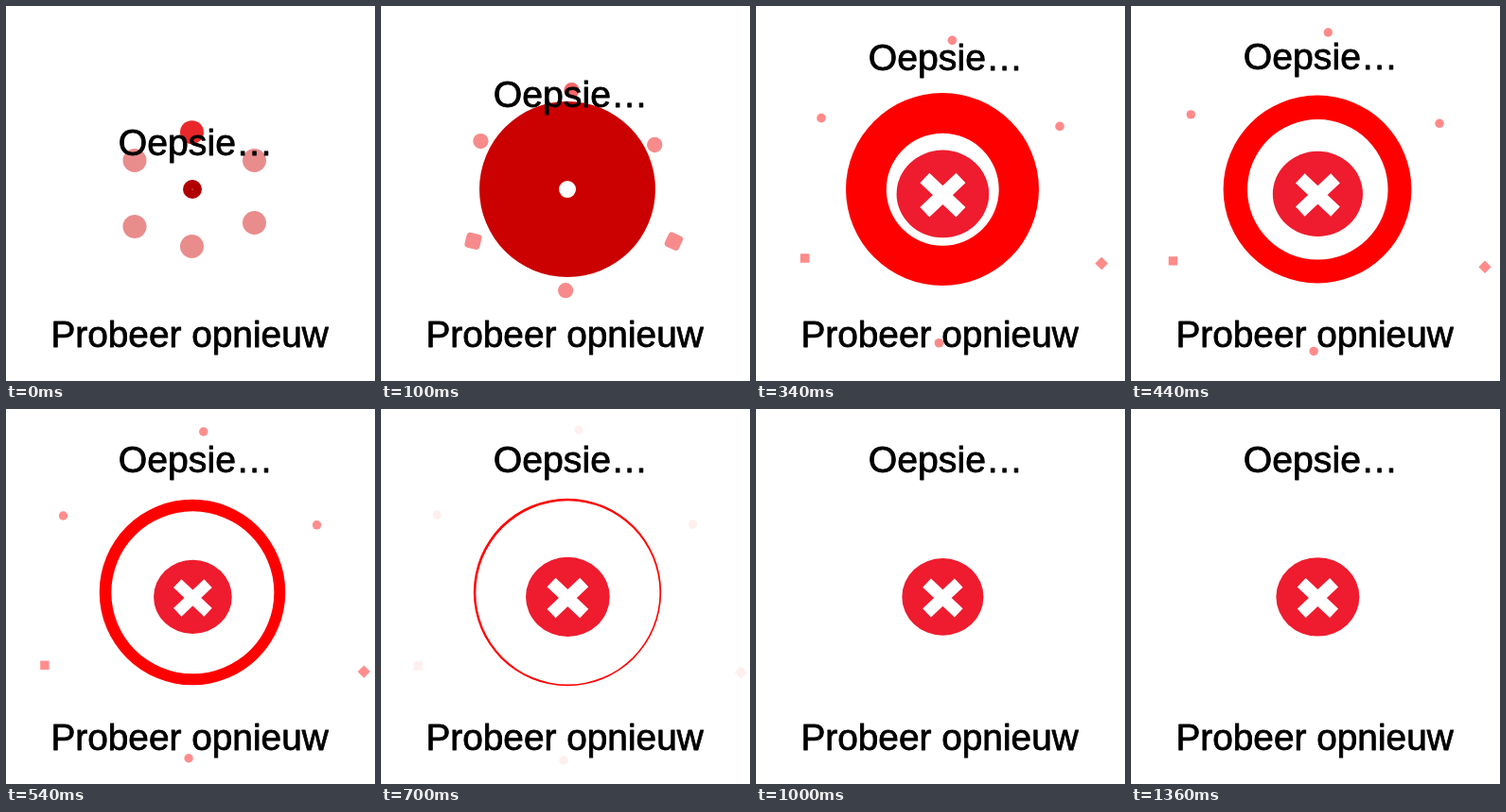
Recreate the animation shown at these times as an HTML page with a canvas. Size 390 by 397 pixels, loop 1.9 s.

```html
<!DOCTYPE html>
<html lang="nl">
<head>
<meta charset="utf-8">
<title>Oepsie…</title>
<style>
  html, body { margin: 0; width: 100%; height: 100%; overflow: hidden; background: #fff; }
  canvas { display: block; width: 390px; height: 397px; }
</style>
</head>
<body>
<canvas id="stage" width="390" height="397"></canvas>
<script>
const ctx = document.getElementById('stage').getContext('2d');
const LOOP = 1900, STEP = 20;
const CENTER = { x: 197, y: 194 };

// Ring radii over time: [ms, px]
const OUTER = [[0, 10], [50, 58], [100, 93], [150, 108], [200, 111], [340, 102], [540, 98.3], [700, 99.2], [780, 99.2]];
const INNER = [[0, 0.5], [100, 9], [200, 29.7], [340, 59.5], [540, 86], [700, 97.1], [780, 99.2]];
const HOLE_SHIFT = 0.4;
const ICON_GROWTH = [[100, 0], [200, 0.48], [290, 1], [340, 1.11]];

// spin: starting offset and final angle in degrees, for the dots that turn into squares
const DOTS = [
  { from: [196.5, 133.7], to: [209, 21.8], color: [234, 40, 44] },
  { from: [136, 163.5], to: [59, 112] },
  { from: [262.5, 163.5], to: [329.8, 122] },
  { from: [136, 233.5], to: [39, 272], spin: [30, 0] },
  { from: [262.5, 229.5], to: [380.6, 279], spin: [-45, 45] },
  { from: [196.5, 254.5], to: [193, 372] }
];
const DOT_START = [233, 140, 140], DOT_END = [255, 138, 138];

const clamp = v => Math.min(1, Math.max(0, v));
const lerp = (a, b, p) => a + (b - a) * p;
const remaining = (t, duration, power) => Math.pow(1 - clamp(t / duration), power);
const rgb = (a, b, p) => `rgb(${a.map((v, i) => Math.round(lerp(v, b[i], p))).join(',')})`;
const radians = degrees => degrees * Math.PI / 180;

// Smooth curve through a few [time, value] points.
function curve(points, t) {
  const last = points.length - 1;
  if (t <= points[0][0]) return points[0][1];
  if (t >= points[last][0]) return points[last][1];
  const i = points.findIndex(p => p[0] > t) - 1;
  const slope = k => {
    const a = points[Math.max(0, k - 1)], b = points[Math.min(last, k + 1)];
    return (b[1] - a[1]) / (b[0] - a[0]);
  };
  const [t0, v0] = points[i], [t1, v1] = points[i + 1];
  const h = t1 - t0, u = (t - t0) / h, w = 1 - u;
  return w * w * (1 + 2 * u) * v0 + u * u * (3 - 2 * u) * v1
    + h * u * w * (w * slope(i) - u * slope(i + 1));
}

function iconScale(t) {
  if (t < 340) return curve(ICON_GROWTH, t);
  if (t >= 1360) return 1;
  return 1 + 0.1556 * Math.exp(-0.003 * (t - 340)) * Math.sin((t - 290) / 400 * 2 * Math.PI);
}

function drawDots(t) {
  const alpha = clamp((725 - t) / 190);
  if (!alpha) return;
  const travel = 1 - remaining(t, 900, 4.3);
  const rest = remaining(t, 500, 3.65);
  const r = 4.7 + 7.8 * rest;
  ctx.globalAlpha = alpha;
  for (const { from, to, color, spin } of DOTS) {
    ctx.save();
    ctx.translate(lerp(from[0], to[0], travel), lerp(from[1], to[1], travel));
    ctx.fillStyle = rgb(color || DOT_START, DOT_END, clamp(t / 160));
    ctx.beginPath();
    if (spin) {
      ctx.rotate(radians(spin[1] + spin[0] * rest));
      ctx.roundRect(-r, -r, 2 * r, 2 * r, r * rest);
    } else {
      ctx.arc(0, 0, r, 0, 2 * Math.PI);
    }
    ctx.fill();
    ctx.restore();
  }
  ctx.globalAlpha = 1;
}

function drawRing(t) {
  const outer = curve(OUTER, t), inner = curve(INNER, t);
  if (outer - inner < 0.1) return;
  const shift = HOLE_SHIFT * inner / outer;
  ctx.fillStyle = rgb([176, 0, 0], [255, 0, 0], clamp(t / 293));
  ctx.beginPath();
  ctx.arc(CENTER.x, CENTER.y, outer, 0, 2 * Math.PI);
  ctx.closePath();
  ctx.moveTo(CENTER.x + shift + inner, CENTER.y + shift);
  ctx.arc(CENTER.x + shift, CENTER.y + shift, inner, 0, 2 * Math.PI);
  ctx.fill('evenodd');
}

function drawIcon(t) {
  const s = iconScale(t);
  if (s <= 0) return;
  ctx.save();
  ctx.translate(197.4, 198.9);
  ctx.scale(s, s);
  if (t < 290) ctx.rotate(radians(25 * (1 - s)));
  ctx.globalAlpha = clamp(0.7 + 0.3 * (t - 100) / 190);
  ctx.fillStyle = '#ee1c2e';
  ctx.beginPath();
  ctx.ellipse(0, 0, 44, 41.7, 0, 0, 2 * Math.PI);
  ctx.fill();
  ctx.globalAlpha = 1;
  ctx.strokeStyle = '#fff';
  ctx.lineWidth = 13;
  ctx.beginPath();
  for (const side of [-1, 1]) {
    ctx.moveTo(-17.2 * side, -15.2);
    ctx.lineTo(17.2 * side, 17.4);
  }
  ctx.stroke();
  ctx.restore();
}

function drawText(text, size, x, y) {
  ctx.font = `${size}px "Liberation Sans", Arial, sans-serif`;
  ctx.fillStyle = ctx.strokeStyle = '#000';
  ctx.lineWidth = 0.8;
  ctx.lineJoin = 'round';
  ctx.fillText(text, x, y);
  ctx.strokeText(text, x, y);
}

function draw(t) {
  ctx.fillStyle = '#fff';
  ctx.fillRect(0, 0, 390, 397);
  drawDots(t);
  drawRing(t);
  drawIcon(t);
  drawText('Oepsie…', 39.2, 118.8, 66.5 + 91 * remaining(t, 500, 3.65));
  drawText('Probeer opnieuw', 38.8, 47.4, 361);
}

const start = performance.now();
function tick() {
  const t = (performance.now() - start) % LOOP;
  draw(Math.floor(t / STEP) * STEP);
  requestAnimationFrame(tick);
}
tick();
</script>
</body>
</html>
```
